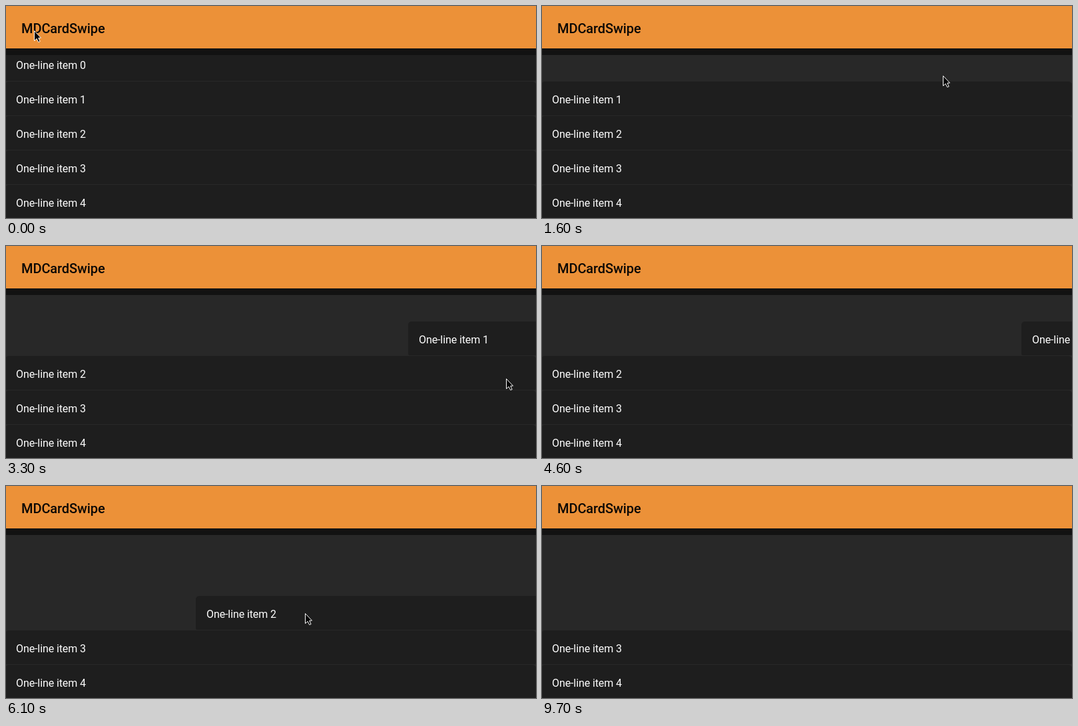
Recreate the animation shown at these times as an HTML page with a canvas. Size 796 by 320 pixels, loop 10000 ms.

```html
<!DOCTYPE html>
<html lang="en">
<head>
<meta charset="utf-8">
<title>MDCardSwipe</title>
<style>
  html, body { margin: 0; width: 100%; height: 100%; overflow: hidden; background: #282828; }
  canvas { display: block; width: 796px; height: 320px; }
</style>
</head>
<body>
<canvas id="stage"></canvas>
<script>
const W = 796, H = 320, LOOP = 10000, STEP = 100;
const ROW = 52, LIST_TOP = 62, ROWS = 5;
const FLY_TIME = 300;

const canvas = document.getElementById('stage');
const ctx = canvas.getContext('2d');
const dpr = window.devicePixelRatio || 1;
canvas.width = W * dpr;
canvas.height = H * dpr;
ctx.scale(dpr, dpr);

const home = { x: 42, y: 37 };
const move = (from, to, x, y) => ({ from, to, x, y });
const moves = [
  // wander over the title
  move(0, 200, 16, 50), move(200, 400, 60, 88), move(400, 600, 88, 67),
  // swipe the first card, return
  move(700, 1275, 602, 105), move(1700, 2700, 15, 139),
  // swipe the second, back up, return
  move(2800, 3300, 751, 200), move(3700, 4100, 641, 157), move(4900, 5700, 15, 189),
  // swipe the third, rest, leave
  move(5900, 6100, 449, 192), move(6100, 6400, 464, 200),
  move(6800, 7000, 278, 228), move(9400, 9600, 543, 163)
];

// Each card follows the pointer from press to held, then flies out on release.
const swipes = [
  { press: 700, held: 1275, release: 1275, grab: 73 },
  { press: 2800, held: 3300, release: 4475, grab: 146 },
  { press: 5900, held: 6100, release: 6100, grab: 163 }
];

const clamp = v => Math.min(1, Math.max(0, v));
const mix = (a, b, f) => a + (b - a) * f;
const inOutSine = f => (1 - Math.cos(Math.PI * f)) / 2;
const outSine = f => Math.sin(Math.PI / 2 * f);

function pointerAt(t) {
  let { x, y } = home;
  for (const m of moves) {
    const f = inOutSine(clamp((t - m.from) / (m.to - m.from)));
    x = mix(x, m.x, f);
    y = mix(y, m.y, f);
  }
  return { x: Math.round(x), y: Math.round(y) };
}

function offsetAt(swipe, t) {
  if (!swipe || t <= swipe.press) return 0;
  const dragged = Math.max(0, pointerAt(Math.min(t, swipe.held)).x - swipe.grab);
  return mix(dragged, W, outSine(clamp((t - swipe.release) / FLY_TIME)));
}

const pointerHidden = t => (t >= 4500 && t < 5000) || t >= 9700;

function band(color, y, h) {
  ctx.fillStyle = color;
  ctx.fillRect(0, y, W, h);
}

function label(text, x, y, font, color) {
  ctx.font = font + ' Roboto, sans-serif';
  ctx.letterSpacing = '-0.1px';
  ctx.fillStyle = color;
  ctx.fillText(text, x, y);
}

function drawCard(i, offset) {
  if (offset >= W) return;
  const x = Math.round(offset) - 1;
  const y = LIST_TOP + i * ROW;
  ctx.fillStyle = '#1e1e1e';
  ctx.beginPath();
  ctx.roundRect(x, y, W + 1, ROW - 1, [5, 5, 2, 2]);
  ctx.fill();
  label('One-line item ' + i, x + 16, y + 33, '16px', '#fff');
}

function drawPointer({ x, y }) {
  const arrow = new Path2D('M0 0V15L3.6 11.8L6.2 17L8.6 16L6.2 10.8L10 10.6Z');
  ctx.save();
  ctx.translate(x + 0.5, y + 0.5);
  ctx.fillStyle = '#000';
  ctx.fill(arrow);
  ctx.strokeStyle = '#fff';
  ctx.lineJoin = 'round';
  ctx.stroke(arrow);
  ctx.restore();
}

function draw(t) {
  band('#282828', 0, H);
  for (let i = 0; i < ROWS; i++) drawCard(i, offsetAt(swipes[i], t));
  band('#121212', 64, 10);
  band('#ec9138', 0, 64);
  label('MDCardSwipe', 23, 41, '500 20px', '#0b0805');
  if (!pointerHidden(t)) drawPointer(pointerAt(t));
}

const start = performance.now();
function frame() {
  const t = (performance.now() - start) % LOOP;
  draw(Math.floor(t / STEP) * STEP);
  requestAnimationFrame(frame);
}
frame();
</script>
</body>
</html>
```
